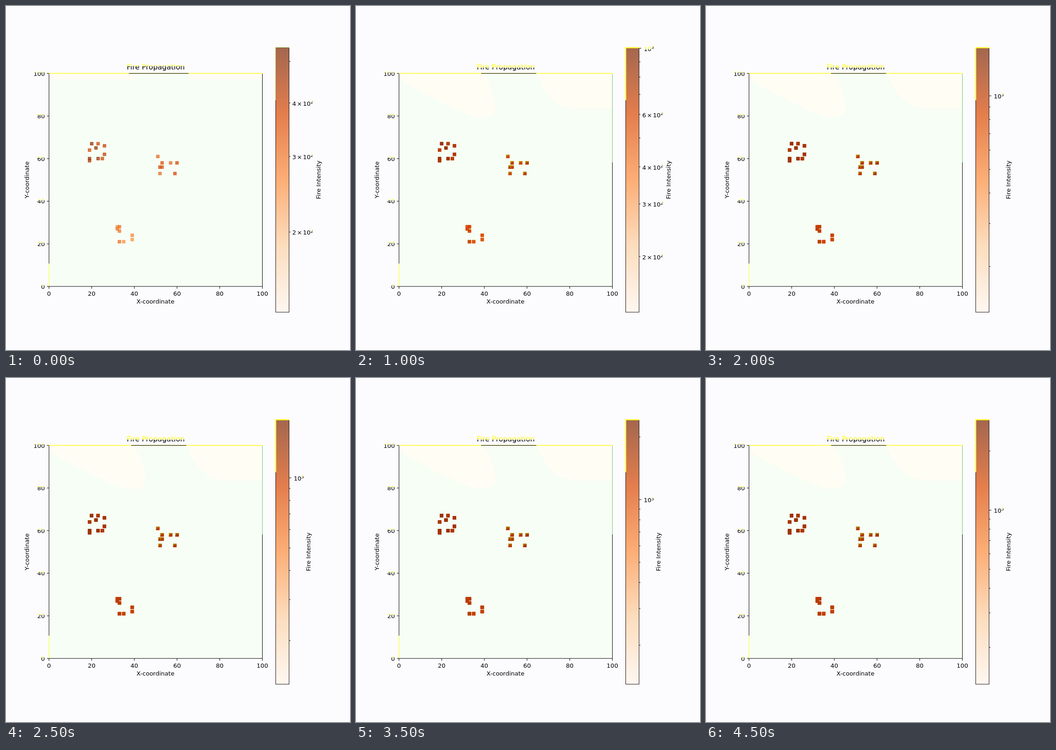
These frames come from a looping animation (748x748 px, 5000 ms). An HTML page with a canvas:

```html
<!DOCTYPE html>
<html lang="en">
<head>
<meta charset="utf-8">
<title>Fire Propagation</title>
<style>
  html, body { margin: 0; width: 100%; height: 100%; overflow: hidden; background: #fcfcff; }
  canvas { display: block; width: 748px; height: 748px; }
</style>
</head>
<body>
<canvas id="stage" width="748" height="748"></canvas>
<script>
const ctx = document.getElementById('stage').getContext('2d');
const STEP = 500;
const PLOT = { left: 93.5, top: 146.5, right: 557.5, bottom: 609.8 };
const BAR = { left: 586.5, top: 90.8, right: 615.5, bottom: 665.8 };
const INK = '#000', YELLOW = '#ffff1a', OLIVE = '#a5a51c', LIME = '#b9d512';
const ALPHA = 0.7;
const V_MIN = 130;
const PEAKS = [538, 714, 1004, 1200, 1574, 1775, 2100, 2417, 2650, 2885];
const ORANGES = [[255, 245, 235], [253, 208, 162], [253, 141, 60], [217, 72, 1], [127, 39, 4]];

const CLUSTERS = [
  { level: .86, cells: [[20, 67], [23, 67], [22, 65], [26, 66], [19, 64], [26, 62], [19, 60], [19, 59], [23, 60], [25, 60]] },
  { level: .71, rim: true, cells: [[51, 61], [53, 58], [57, 58], [60, 58], [52, 56], [53, 56], [52, 53], [59, 53]] },
  { level: .57, cells: [[32, 28], [33, 28], [32, 27], [33, 26], [39, 24], [39, 22], [33, 21], [35, 21]] }
];

const WARM_START = new Path2D('M94 147H275L282 160H94Z M395 147H557V160H402Z');
const WARM_SPREAD = new Path2D(
  'M94 147H278Q304 190 303 225Q301 245 258 241Q190 215 94 160Z M393 147H557V223H475Q420 220 393 147Z');

const lerp = (a, b, t) => a + (b - a) * t;
const plotX = x => lerp(PLOT.left, PLOT.right, x / 100);
const plotY = y => lerp(PLOT.bottom, PLOT.top, y / 100);

function heat(level) {
  const last = ORANGES.length - 1;
  const pos = Math.max(0, Math.min(1, level)) * last;
  const i = Math.min(last - 1, Math.floor(pos));
  const rgb = ORANGES[i].map((c, n) => Math.round(lerp(c, ORANGES[i + 1][n], pos - i)));
  return `rgba(${rgb},${ALPHA})`;
}

// Repeatable noise between -1 and 1.
function noise(x, y) {
  const n = Math.sin(x * 12.99 + y * 78.23) * 43758.5;
  return (n - Math.floor(n)) * 2 - 1;
}

function line(x1, y1, x2, y2, color = INK, width = 1) {
  ctx.strokeStyle = color;
  ctx.lineWidth = width;
  ctx.beginPath();
  ctx.moveTo(x1, y1);
  ctx.lineTo(x2, y2);
  ctx.stroke();
}

function text(str, x, y, { size = 13, align = 'left', fill = INK } = {}) {
  ctx.font = `${size}px "DejaVu Sans", sans-serif`;
  ctx.textAlign = align;
  ctx.fillStyle = fill;
  ctx.fillText(str, x, y);
}

function verticalText(str, x, y) {
  ctx.save();
  ctx.translate(x, y);
  ctx.rotate(-Math.PI / 2);
  text(str, 0, 0, { align: 'center' });
  ctx.restore();
}

// Yellow above the cut, ink below it.
function split(cut) {
  const g = ctx.createLinearGradient(0, cut - 1, 0, cut + 1);
  g.addColorStop(0, YELLOW);
  g.addColorStop(1, INK);
  return g;
}

function drawGround(step) {
  ctx.fillStyle = '#fcfcff';
  ctx.fillRect(0, 0, 748, 748);
  ctx.fillStyle = '#f7fef5';
  ctx.fillRect(94, 147, 463, 463);
  ctx.fillStyle = '#fffdf4';
  ctx.fill(step ? WARM_SPREAD : WARM_START);
}

// Every step paints another translucent layer over the earlier ones.
function drawFires(step) {
  const r = 3.1;
  for (const { level, rim, cells } of CLUSTERS) {
    for (const [cx, cy] of cells) {
      const x = plotX(cx), y = plotY(cy);
      const first = level + .1 * noise(cx, cy);
      const settled = .7 + .23 * first;
      for (let s = 0; s <= step; s++) {
        ctx.fillStyle = ctx.strokeStyle = heat(lerp(settled, first, Math.exp(-s * .7)));
        ctx.lineWidth = 1.2;
        ctx.fillRect(x - r, y - r, 2 * r, 2 * r);
        ctx.strokeRect(x - r, y - r, 2 * r, 2 * r);
      }
      if (rim && step) {
        line(x - r, y - r, x + r, y - r, LIME);
        line(x - r, y - r, x - r, y + 1, LIME);
      }
    }
  }
}

function drawAxes(step) {
  const { left, top, right, bottom } = PLOT;
  line(left, top, left, bottom);
  line(left, 560, left, bottom, YELLOW);
  line(right, top, right, bottom);
  if (step) line(right, top, right, 340, '#6fc46f');
  line(left, bottom, right + .5, bottom);
  line(left - .5, top, right + .5, top, YELLOW, 1.3);
  line(step ? 272 : 267, top, step ? 392 : 397, top);

  for (let v = 0; v <= 100; v += 20) {
    const x = plotX(v), y = plotY(v);
    line(x, bottom, x, bottom + 5);
    line(left - 4.5, y, left, y);
    text(v, x, 629.5, { align: 'center' });
    text(v, 84.5, y + 5, { align: 'right', fill: split(y - 2) });
  }
  text('X-coordinate', 325, 647, { align: 'center' });
  verticalText('Y-coordinate', 50.3, 378);
  text('Fire Propagation', 325.5, 138, { size: 15.58, align: 'center', fill: split(step ? 134 : 131) });
}

function drawPower(mantissa, exponent, y) {
  const base = y + 5.9;
  let x = 625.7;
  if (mantissa) {
    text(mantissa, 622.4, base);
    text('×', 632.7, base);
    x = 645.7;
  }
  text('10', x, base, { fill: split(94) });
  text(exponent, x + 16.5, base - 4.8, { size: 9.1, fill: split(base - 9) });
}

function drawBar(step) {
  const { left, top, right, bottom } = BAR;
  const g = ctx.createLinearGradient(0, bottom, 0, top);
  for (let t = 0; t <= 1; t += .25) g.addColorStop(t, heat(t));
  ctx.fillStyle = g;
  ctx.fillRect(left, top, right - left, bottom - top);
  ctx.strokeStyle = '#1c0c08';
  ctx.lineWidth = 1;
  ctx.strokeRect(left, top, right - left, bottom - top);
  const glow = step ? YELLOW : OLIVE, width = step ? 2.2 : 1;
  line(left - .5, top, right + .5, top, glow, width);
  line(left, top, left, 205, glow, width);

  const peak = PEAKS[step];
  const scale = (bottom - top) / Math.log(peak / V_MIN);
  const minorLabels = peak < V_MIN * 10;
  for (let v = 200; v <= peak; v += v < 1000 ? 100 : 1000) {
    const y = bottom - scale * Math.log(v / V_MIN);
    const major = v === 1000;
    line(right, y, right + (major ? 5 : 3), y);
    if (major) drawPower('', '3', y);
    else if (minorLabels && [200, 300, 400, 600].includes(v)) drawPower(v / 100, '2', y);
  }
  verticalText('Fire Intensity', minorLabels ? 684.2 : 662.2, 378);
}

function render(elapsed) {
  const step = Math.floor(elapsed / STEP) % PEAKS.length;
  drawGround(step);
  drawFires(step);
  drawAxes(step);
  drawBar(step);
}

let start;
function tick(now) {
  start ??= now;
  render(now - start);
  requestAnimationFrame(tick);
}
render(0);
requestAnimationFrame(tick);
</script>
</body>
</html>
```
